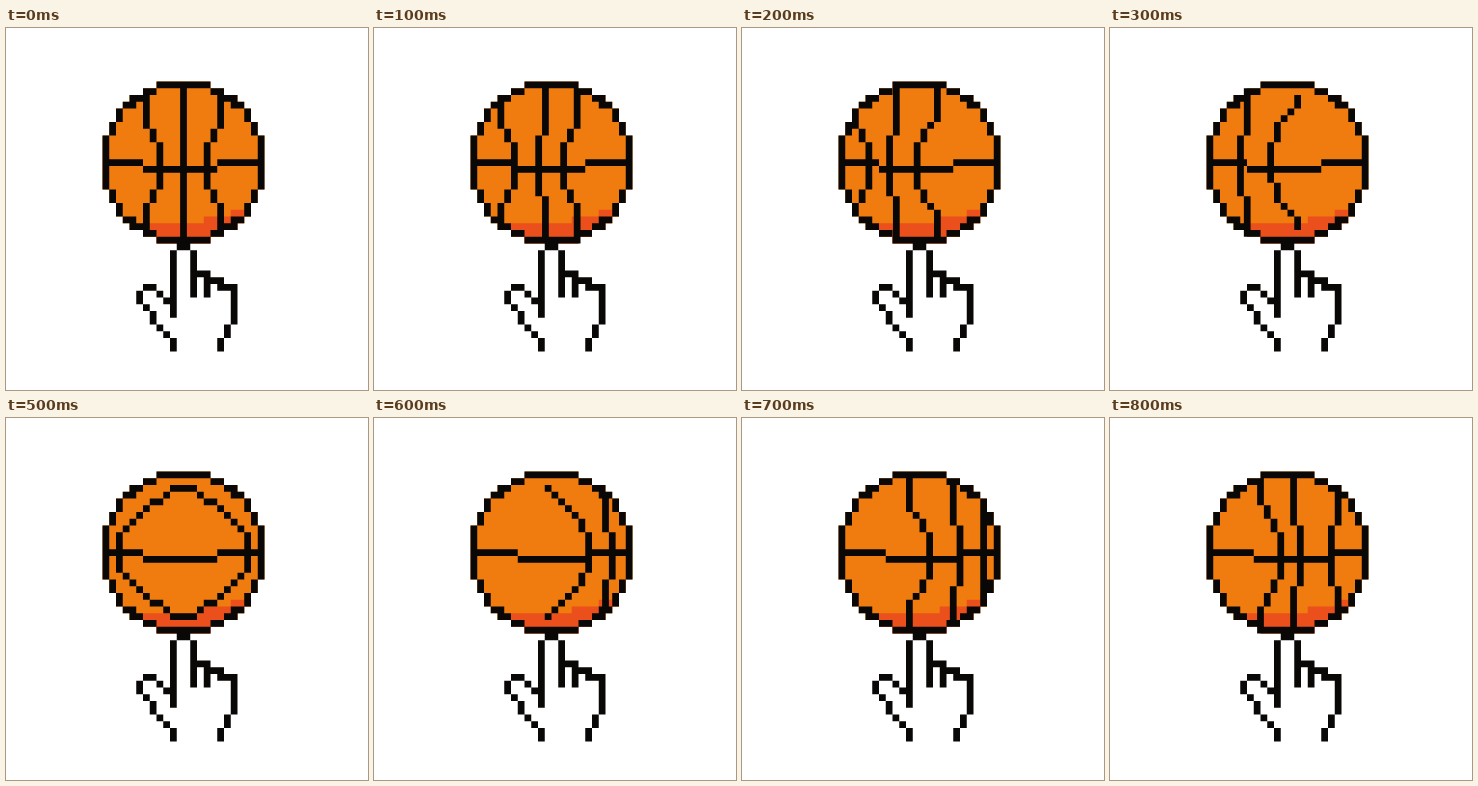
Write an HTML page with a canvas that moves like this. It is 362 by 362 pixels and loops after 0.9 s.

```html
<!DOCTYPE html>
<html lang="en">
<head>
<meta charset="utf-8">
<title>Spinning basketball</title>
<style>
html, body { margin: 0; width: 100%; height: 100%; overflow: hidden; background: #fff; }
canvas { display: block; width: 100vw; height: 100vh; }
</style>
</head>
<body>
<canvas id="stage" width="362" height="362"></canvas>
<script>
const ctx = document.getElementById('stage').getContext('2d');
const INK = '#0a0806', ORANGE = '#f07c10', RED = '#ea4f1c';
const LEFT = 96.5, TOP = 53.5, CELL = 6.75;
const SIZE = 24, STEP = 100, POSES = 9;

// Each seam has keys of [step, column at the top, column at the equator].
const SEAMS = [
  [[-4, 11.5, 21], [-2, 9.5, 13], [0, 6, 8], [2, 2, 4]],
  [[-3, 19, 20.5], [-2, 16.5, 17.5], [-1, 12.4, 13.4], [1, 10.6, 9.6], [4, 3, 2]],
  [[-2, 20.5, 21], [0, 17, 15], [1, 15.3, 13.3], [3, 13, 9], [5, 11.5, 2]]
];

const HAND = [
  '11,24 12,24', '10,25 10,34', '13,25 13,31', '15,28 15,31', '17,29 17,30',
  '13,28 15,28 16,29 17,29 18,30 19,30 19,35 18,36 18,37 17,38 17,39',
  '9,32 7,30 6,30 5,31 5,32 7,34 7,35 10,38 10,39'
];

function block(col, row, w = 1, h = 1) {
  ctx.rect(LEFT + col * CELL, TOP + row * CELL, w * CELL, h * CELL);
}

// Collect blocks into one path so that neighbours join without gaps.
function paint(color, build) {
  ctx.fillStyle = color;
  ctx.beginPath();
  build();
  ctx.fill();
}

// Squared distance from the ball's centre, slightly flattened.
function reachOf(col, row) {
  const x = col + 0.5 - SIZE / 2, y = row + 0.5 - SIZE / 2;
  return x * x + 1.03 * y * y;
}
const inBall = (col, row) => reachOf(col, row) < 151;
const onRim = (col, row) => inBall(col, row) && reachOf(col, row) > 130.4;
const inShade = (col, row) =>
  inBall(col, row) && row >= 18 && col > 20.5 - 1.62 * (row - 18) ** 2;

function cells(test) {
  for (let row = 0; row < SIZE; row++)
    for (let col = 0; col < SIZE; col++)
      if (test(col, row)) block(col, row);
}

// Linear interpolation of [top, mid], or null outside the keys.
function sample(keys, step) {
  const i = keys.findIndex(key => key[0] >= step);
  if (i < 0 || step < keys[0][0]) return null;
  const b = keys[i], a = keys[Math.max(0, i - 1)];
  const k = a === b ? 0 : (step - a[0]) / (b[0] - a[0]);
  return [1, 2].map(n => a[n] + (b[n] - a[n]) * k);
}

function seam([top, mid]) {
  const bend = Math.abs(top - mid), dir = Math.sign(top - mid);
  const wide = bend > 3.75;
  const axis = wide ? 12 : 12.5, span = wide ? 9.5 : 11;
  const reach = Math.min(9.5, 4.5 + bend);
  const shift = d => Math.floor(bend * Math.min(1, Math.abs(d) / reach) ** 2.2 + 0.45);

  for (let d = -span; d <= span; d++) {
    const outer = shift(d);
    const inner = Math.min(outer, shift(Math.max(0, Math.abs(d) - 1)) + 1);
    const row = axis + d - 0.5;
    for (let s = inner; s <= outer; s++) {
      const col = mid + dir * s;
      if (inBall(Math.round(col), row)) block(col, row);
    }
  }
}

function equator(pose) {
  const from = pose > 5 ? 7 : 6, to = from + 11;
  block(0, 11.5, from);
  block(from, 12.5, to - from);
  block(to, 11.5, SIZE - to);
}

// Walk a polyline cell by cell.
function trace(path) {
  const points = path.split(' ').map(p => p.split(',').map(Number));
  for (let i = 1; i < points.length; i++) {
    const [x, y] = points[i - 1], [u, v] = points[i];
    const n = Math.max(Math.abs(u - x), Math.abs(v - y));
    for (let k = 0; k <= n; k++)
      block(Math.round(x + (u - x) * k / n), Math.round(y + (v - y) * k / n));
  }
}

function render(time) {
  const pose = Math.floor(time / STEP) % POSES;
  ctx.fillStyle = '#fff';
  ctx.fillRect(0, 0, 362, 362);
  paint(ORANGE, () => cells(inBall));
  paint(RED, () => cells(inShade));
  paint(INK, () => {
    cells(onRim);
    equator(pose);
    for (const keys of SEAMS) {
      const place = sample(keys, pose) || sample(keys, pose - POSES);
      if (place) seam(place);
    }
    HAND.forEach(trace);
  });
}

let start;
function tick(now) {
  start ??= now;
  render(now - start);
  requestAnimationFrame(tick);
}
render(0);
requestAnimationFrame(tick);
</script>
</body>
</html>
```
